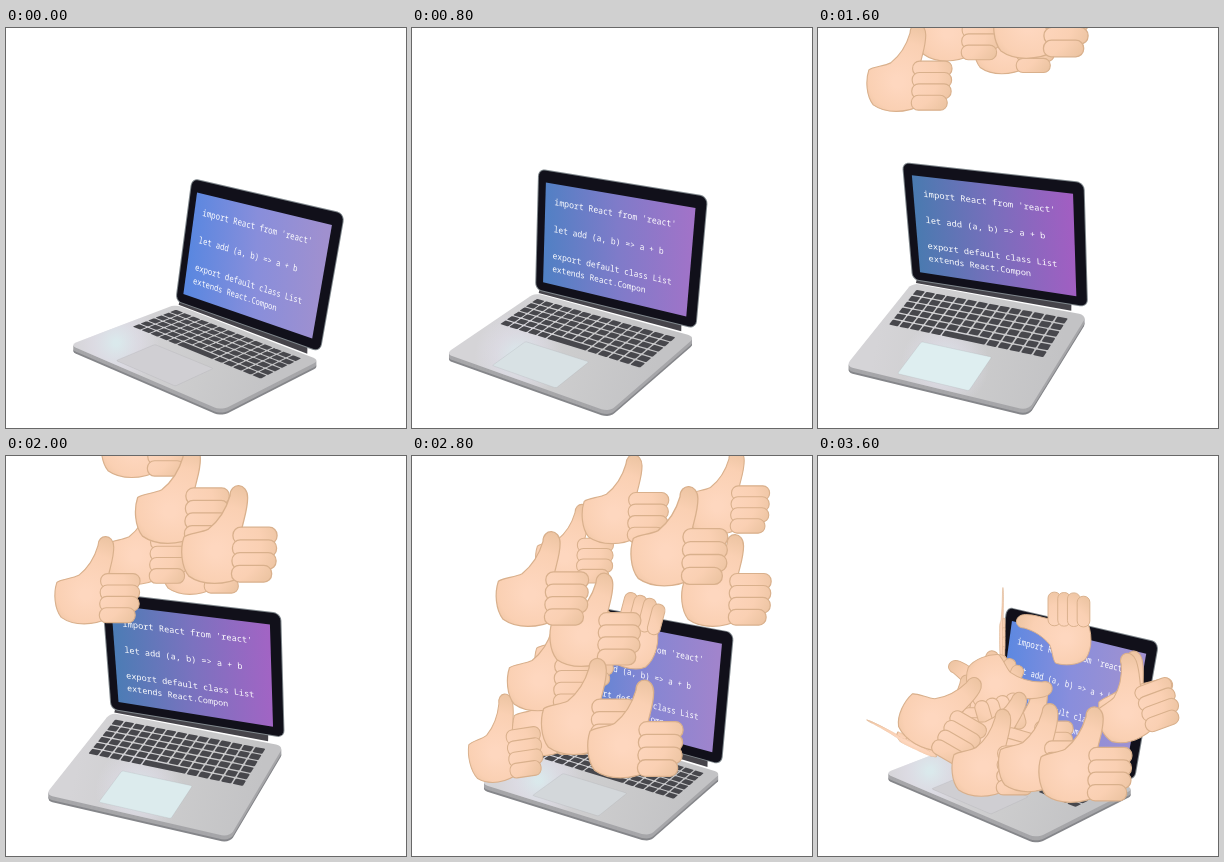
An HTML page with a canvas that plays this animation: 400 by 400 pixels, repeating every 3700 ms.

```html
<!DOCTYPE html>
<html lang="en">
<head>
<meta charset="utf-8">
<title>Laptop and thumbs</title>
<style>
html, body { margin: 0; width: 100%; height: 100%; overflow: hidden; background: #fff; }
canvas { display: block; width: 400px; height: 400px; }
</style>
</head>
<body>
<canvas id="stage" width="400" height="400"></canvas>
<script>
const LOOP = 3700, STEP = 100, RAD = Math.PI / 180;
const ctx = document.getElementById('stage').getContext('2d');
const mix = (a, b, k) => a + (b - a) * k;

// Each laptop corner sways on its own sine, once per loop
function laptopAt(t) {
  const sway = (mean, swing, lead) => mean + swing * Math.cos((t / LOOP * 360 + lead) * RAD);
  const lid = [
    [sway(138, 53, 24), sway(143.5, 8.5, 25)],
    [sway(303.5, 38, 25), sway(171, 16, 20)],
    [sway(293.5, 25, 36), sway(301, 23, 15)],
    [sway(135, 40, 28), sway(262, 11, 18)]
  ];
  const [, , [rx, ry], [lx, ly]] = lid;
  const base = [
    [lx - 1, ly + 4],
    [rx, ry + 9],
    [sway(217, 20, 95), sway(382, 2, -78)],
    [sway(49, 24, 52), sway(328, -11, 0)]
  ];
  return { lid, base, turn: sway(.5, -.5, 24) };
}

// Perspective map from a w by h rectangle onto four corners
function plane(w, h, [a, b, c, d]) {
  const sx = a[0] - b[0] + c[0] - d[0], sy = a[1] - b[1] + c[1] - d[1];
  const x1 = b[0] - c[0], y1 = b[1] - c[1], x2 = d[0] - c[0], y2 = d[1] - c[1];
  const det = x1 * y2 - x2 * y1;
  const g = (sx * y2 - x2 * sy) / det, k = (x1 * sy - sx * y1) / det;
  return (x, y) => {
    const u = x / w, v = y / h, z = g * u + k * v + 1;
    return [0, 1].map(i =>
      ((b[i] - a[i] + g * b[i]) * u + (d[i] - a[i] + k * d[i]) * v + a[i]) / z);
  };
}

function trace(map, x, y, w, h, r = 0, dy = 0) {
  ctx.beginPath();
  const corners = [[x + r, y + r, 2], [x + w - r, y + r, 3],
                   [x + w - r, y + h - r, 0], [x + r, y + h - r, 1]];
  for (const [cx, cy, q] of corners) {
    for (let i = 0; i <= (r ? 5 : 0); i++) {
      const a = (q + i / 5) * Math.PI / 2;
      const p = map(cx + r * Math.cos(a), cy + r * Math.sin(a));
      ctx.lineTo(p[0], p[1] + dy);
    }
  }
  ctx.closePath();
}

function fill(style) {
  ctx.fillStyle = style;
  ctx.fill();
}

function linear(p, q, stops) {
  const g = ctx.createLinearGradient(...p, ...q);
  stops.forEach((c, i) => g.addColorStop(i / (stops.length - 1), c));
  return g;
}

const blend = (a, b, k) => `rgb(${a.map((v, i) => Math.round(mix(v, b[i], k)))})`;

function drawKeys(map) {
  const rows = 6, cols = 14, pitchX = 20, pitchY = 16.2;
  for (let row = 0; row < rows; row++) {
    for (let col = 0; col < cols; col++) {
      const isBar = row === rows - 1 && col > 4 && col < 9;
      if (isBar && col > 5) continue;
      trace(map, 17 + col * pitchX, 15 + row * pitchY, (isBar ? 4 : 1) * pitchX - 2.8, 13.2, 2);
      fill('#47474c');
    }
  }
}

function drawBase(map, turn) {
  for (let dy = 6; dy > 0; dy--) {
    trace(map, 0, 0, 320, 220, 13, dy);
    fill(dy > 4 ? '#85868a' : '#a6a6a9');
  }
  trace(map, 0, 0, 320, 220, 13);
  fill(linear(map(0, 110), map(320, 110), ['#d5d4d7', '#cccccd', '#c3c3c5']));
  ctx.save();
  ctx.clip();
  const [sx, sy] = map(40 + 115 * turn, 168);
  const sheen = ctx.createRadialGradient(sx, sy, 3, sx, sy, 44);
  sheen.addColorStop(0, 'rgba(220,240,243,.75)');
  sheen.addColorStop(.5, 'rgba(228,226,240,.45)');
  sheen.addColorStop(1, 'rgba(228,226,240,0)');
  ctx.fillStyle = sheen;
  ctx.fillRect(0, 0, 400, 400);
  ctx.restore();

  trace(map, 92, 132, 126, 78, 3);
  fill(blend([207, 206, 210], [222, 238, 240], turn));
  ctx.strokeStyle = 'rgba(150,150,155,.3)';
  ctx.lineWidth = .6;
  ctx.stroke();
  drawKeys(map);
}

const code = ["import React from 'react'", '', 'let add (a, b) => a + b', '',
              'export default class List', 'extends React.Compon'];

function drawCode(map) {
  const size = 15.8, x = 34;
  ctx.fillStyle = '#fff';
  ctx.font = `${size}px "Noto Sans Mono", "DejaVu Sans Mono", monospace`;
  code.forEach((line, i) => {
    if (!line) return;
    const w = line.length * size * .6, y = 59 + i * 24.8;
    const o = map(x, y), r = map(x + w, y);
    const m = map(x + w / 2, y), up = map(x + w / 2, y - 12);
    ctx.save();
    ctx.transform((r[0] - o[0]) / w, (r[1] - o[1]) / w,
                  (m[0] - up[0]) / 12, (m[1] - up[1]) / 12, o[0], o[1]);
    ctx.fillText(line, 0, 0);
    ctx.restore();
  });
}

function drawLid(map, turn) {
  trace(map, 0, 0, 320, 224, 12);
  ctx.lineJoin = 'round';
  ctx.strokeStyle = '#7f878c';
  ctx.lineWidth = 2;
  ctx.stroke();
  fill('#11101a');
  trace(map, 15, 21, 287, 187);
  fill(linear(map(15, 150), map(302, 90), [
    blend([90, 136, 226], [74, 122, 176], turn),
    blend([137, 143, 220], [121, 110, 188], turn),
    blend([160, 146, 208], [162, 94, 194], turn)
  ]));
  drawCode(map);
}

const palm = new Path2D('M50 12C50-2 68-2 68 14C68 26 64 36 62 46L64 94' +
  'C45 104 22 104 8 94C0 84-1 66 3 54C8 50 20 50 28 46C38 38 46 26 50 12Z');
const fingers = [0, 1, 2, 3].map(i => {
  const p = new Path2D();
  p.roundRect(53 - i * .5, 44 + i * 13, i === 3 ? 41 : 45, 17, 8);
  return p;
});
const skin = ctx.createRadialGradient(36, 68, 6, 46, 58, 62);
skin.addColorStop(0, '#fed7bf');
skin.addColorStop(.6, '#fad0b3');
skin.addColorStop(1, '#eac29f');

function drawHand({ x, y, size, tilt, flat }) {
  ctx.save();
  ctx.translate(x, y);
  ctx.rotate(tilt * RAD);
  ctx.scale(size * flat, size);
  ctx.translate(-50, -52);
  ctx.strokeStyle = '#d9b08c';
  ctx.lineWidth = 1.3;
  ctx.fillStyle = skin;
  for (const p of [palm, ...fingers]) {
    ctx.fill(p);
    ctx.stroke(p);
  }
  ctx.restore();
}

// Back to front: time of entry, column, height of rest, and how it tumbles there
const hands = [
  { enter: 2545, x: 163, rest: 168, to: 205, flat: 0 },
  { enter: 2170, x: 163, rest: 228, tilt: -70 },
  { enter: 1580, x: 197, rest: 172, to: 236, tilt: -90 },
  { enter: 2700, x: 317, rest: 236, tilt: -25 },
  { enter: 1640, x: 142, rest: 258 },
  { enter: 1410, x: 92, rest: 282, to: 84, tilt: -64, flat: .12 },
  { enter: 2680, x: 214, rest: 272 },
  { enter: 2080, x: 140, rest: 235, to: 206, tilt: 75 },
  { enter: 2425, x: 315, rest: 240, tilt: -25 },
  { enter: 2280, x: 184, rest: 276, tilt: 20 },
  { enter: 2430, x: 131, rest: 257, tilt: 40 },
  { enter: 1850, x: 177, rest: 297 },
  { enter: 1675, x: 224, rest: 292 },
  { enter: 2570, x: 268, rest: 299 }
];

// Steady fall, quicker for later hands, then a tumble on landing
function handAt({ enter, x, rest, to = x, tilt = 0, flat = 1 }, depth, t) {
  const speed = .21 + (enter - 1400) * .00012;
  const landing = enter + rest / speed;
  const u = Math.min(1, Math.max(0, (t - landing) / 800));
  const k = 1 - (1 - u) ** 2;
  return {
    x: mix(x, to, u * u),
    y: Math.min(rest, speed * (t - enter)),
    size: (.8 + .015 * depth) * (1 - .1 * k),
    tilt: tilt * k,
    flat: mix(1, flat, k)
  };
}

function draw(t) {
  ctx.clearRect(0, 0, 400, 400);
  const { lid, base, turn } = laptopAt(t);
  drawBase(plane(320, 220, base), turn);
  trace(plane(320, 10, [lid[3], lid[2], base[1], base[0]]), 14, -2, 292, 10);
  fill('#46444a');
  drawLid(plane(320, 224, lid), turn);
  hands.map((h, i) => handAt(h, i, t)).filter(h => h.y > -60).forEach(drawHand);
}

function tick() {
  draw(Math.floor(performance.now() % LOOP / STEP) * STEP);
  requestAnimationFrame(tick);
}
tick();
</script>
</body>
</html>
```
